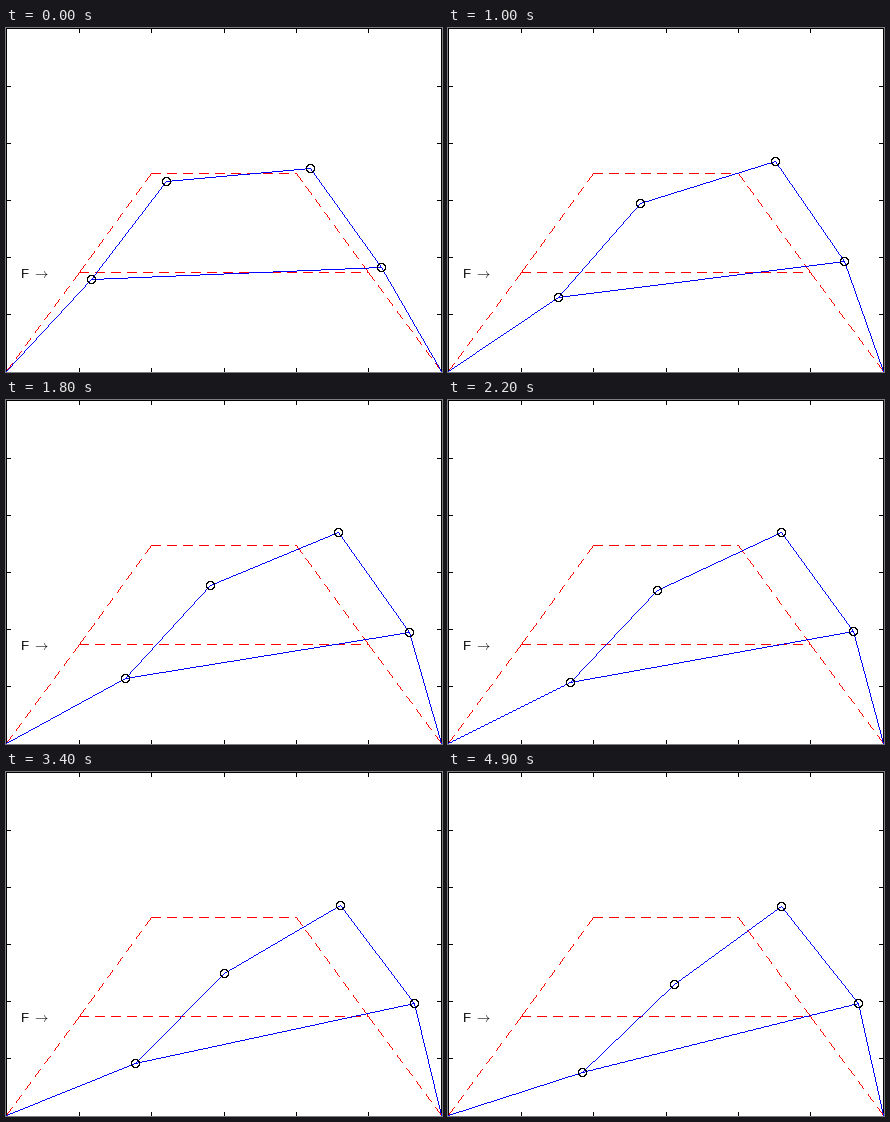
Write a matplotlib script that moves like this. It is 436 by 344 pixels and loops after 5000 ms.

```python
import numpy as np
import matplotlib.pyplot as plt
from matplotlib.animation import FuncAnimation

WIDTH, HEIGHT, DPI = 436, 344, 100
FRAMES, INTERVAL = 50, 100
PT = 72 / DPI  # points per pixel
ROOT3 = np.sqrt(3)
BARS = [(0, 1), (1, 2), (2, 3), (3, 4), (4, 5), (1, 4)]
REST = np.array([(0, 0), (1, ROOT3), (2, 2 * ROOT3),
                 (4, 2 * ROOT3), (5, ROOT3), (6, 0)])
DASH, GAP = 10, 6
PIN_RADIUS = 4

plt.rcParams["mathtext.fontset"] = "cm"
plt.rcParams["path.simplify"] = False


def to_pixels(points):
    return np.asarray(points) * (72.4, -57.1) + (0.3, 343.2)


def softened(frame):
    """Load scale: the linkage stiffens as the force grows."""
    return np.log1p(0.15 * np.asarray(frame))


# Bar angles in degrees at a few moments of the loading
key_frames = softened([0, 10, 18, 26, 34, 42, 49])
leg_fit = np.polyfit(key_frames, [54.0, 40.6, 34.8, 30.6, 27.2, 24.4, 22.3], 3)
upper_fit = np.polyfit(key_frames, [59.1, 55.6, 54.3, 52.9, 51.9, 51.1, 50.5], 2)


def polar(radius, degrees):
    angle = np.radians(degrees)
    return radius * np.array([np.cos(angle), np.sin(angle)])


def joint(left, right, left_length, right_length):
    """Upper meeting point of two rigid bars."""
    span = right - left
    gap = np.hypot(*span)
    along = (left_length**2 - right_length**2 + gap**2) / (2 * gap)
    rise = np.sqrt(left_length**2 - along**2)
    unit = span / gap
    return left + along * unit + rise * np.array([-unit[1], unit[0]])


def pose(frame):
    load = softened(frame)
    a = polar(2, np.polyval(leg_fit, load))
    b = a + polar(2, np.polyval(upper_fit, load))
    d = joint(a, REST[5], 4, 2)
    c = joint(b, d, 2, 2)
    return to_pixels([REST[0], a, b, c, d, REST[5]])


def line_pixels(start, end, dashed=False):
    """Pixels of a hard-edged line one pixel wide."""
    start, end = np.rint(start), np.rint(end)
    steps = int(np.abs(end - start).max())
    t = np.linspace(0, 1, steps + 1)
    points = np.rint(start + t[:, None] * (end - start))
    if dashed:
        points = points[t * np.hypot(*(end - start)) % (DASH + GAP) < DASH]
    return points


def ring_pixels(center):
    angles = np.linspace(0, 360, 60, endpoint=False)
    return np.rint(center) + np.rint(polar(PIN_RADIUS, angles)).T


def bar_pixels(nodes, dashed=False):
    return np.vstack([line_pixels(nodes[i], nodes[j], dashed) for i, j in BARS])


def fill_pixels(artist, points):
    """Cover each pixel with a one-pixel dash, separated by breaks."""
    x, y = points.T
    breaks = np.full_like(x, np.nan)
    artist.set_data(np.column_stack([x, x + 1, breaks]).ravel(),
                    np.column_stack([y + 0.5, y + 0.5, breaks]).ravel())


fig = plt.figure(figsize=(WIDTH / DPI, HEIGHT / DPI), dpi=DPI, facecolor="white")
ax = fig.add_axes([0, 0, 1, 1])
ax.set(xlim=(0, WIDTH), ylim=(HEIGHT, 0))
ax.axis("off")


def layer(color):
    return ax.plot([], [], color=color, lw=PT, solid_capstyle="butt", snap=False)[0]


right, bottom = WIDTH - 1, HEIGHT - 1
frame_lines = [((0, 0), (right, 0)), ((0, 0), (0, bottom)),
               ((right, 0), (right, bottom))]
for i in range(1, 6):
    x, y = to_pixels((i, i))
    frame_lines += [((x, 0), (x, 4)), ((x, bottom - 3), (x, bottom)),
                    ((0, y), (4, y)), ((right - 4, y), (right, y))]
fill_pixels(layer("black"), np.vstack([line_pixels(*ends) for ends in frame_lines]))
fill_pixels(layer("red"), bar_pixels(to_pixels(REST), dashed=True))

ax.text(15, 250.5, "F", family="Liberation Sans", size=13.3 * PT)
ax.text(25.5, 250.5, r"$\rightarrow$", size=13.3 * PT)

bars, pins = layer("blue"), layer("black")


def draw(frame):
    nodes = pose(frame)
    fill_pixels(bars, bar_pixels(nodes))
    fill_pixels(pins, np.vstack([ring_pixels(node) for node in nodes[1:5]]))
    return bars, pins


animation = FuncAnimation(fig, draw, frames=FRAMES, interval=INTERVAL,
                          repeat=True, repeat_delay=0, blit=False)
plt.show()
```
